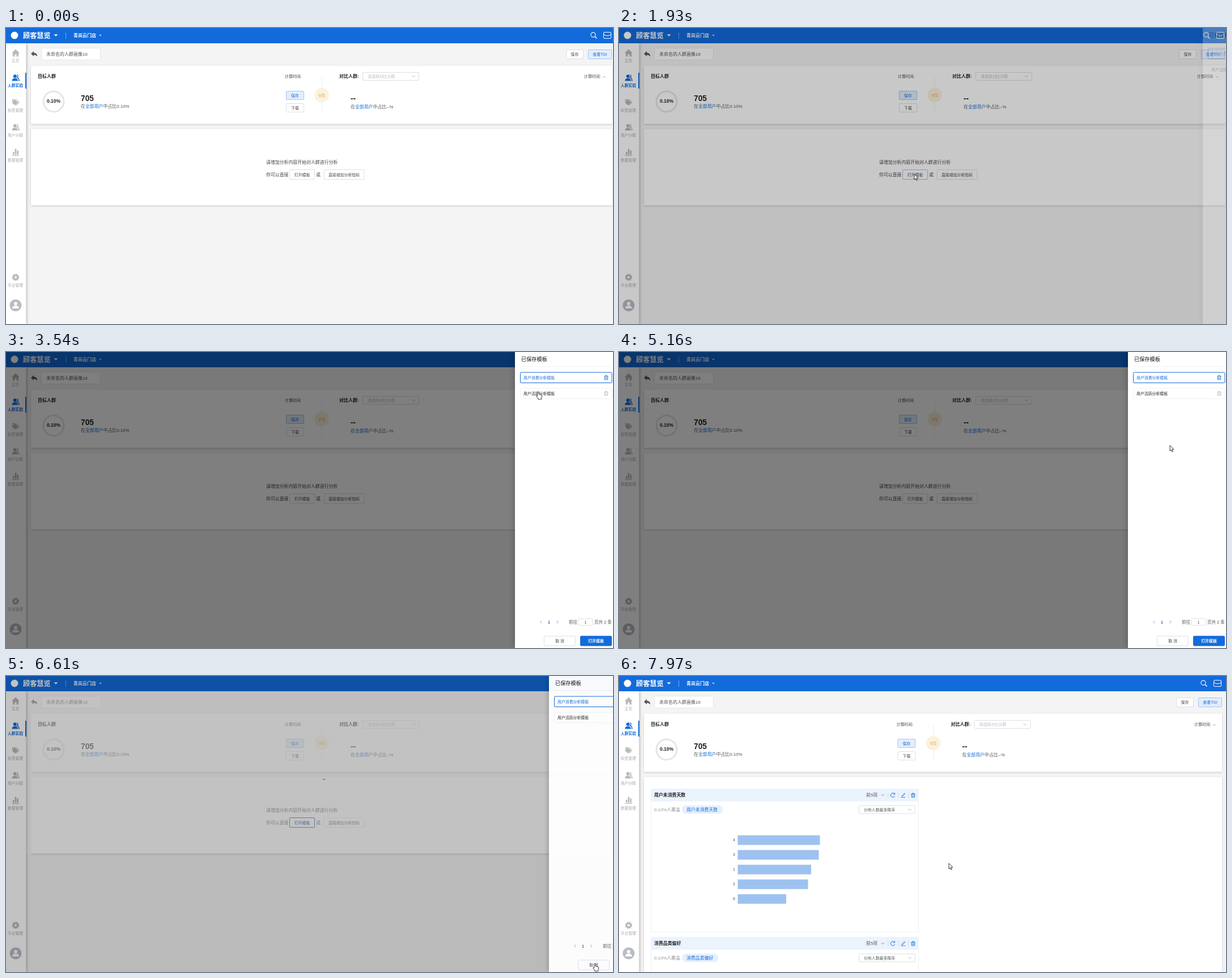
Write an HTML page that moves like this. It is 1071 px wide and 523 px high and loops after 8000 ms.

```html
<!DOCTYPE html>
<html lang="zh">
<head>
<meta charset="utf-8">
<title>人群画像</title>
<style>
html, body { margin: 0; width: 100%; height: 100%; overflow: hidden; background: #f4f4f5; }
svg { display: block; width: 1071px; height: 523px; font-family: "Liberation Sans", "Noto Sans CJK SC", "Noto Sans CJK", sans-serif; }
text { white-space: pre; }
.card { filter: drop-shadow(0 1px 1.5px rgba(0,0,0,.2)); }
.side { filter: drop-shadow(1px 0 2px rgba(0,0,0,.3)); }
.panel { filter: drop-shadow(-2px 0 4px rgba(0,0,0,.2)); }
</style>
</head>
<body>
<svg id="stage" viewBox="0 0 1071 523"></svg>
<script>
const BLUE = '#136bdb', INK = '#222', GREY = '#b9b9b9';

// Drawing helpers
const text = (x, cy, size, str, fill = INK, more = '') =>
  `<text x="${x}" y="${cy + size * .37}" font-size="${size}" fill="${fill}" ${more}>${str}</text>`;
const bold = 'font-weight="700"', mid = 'text-anchor="middle"';
const rect = (x, y, w, h, fill, stroke = 'none', r = 0, more = '') =>
  `<rect x="${x}" y="${y}" width="${w}" height="${h}" rx="${r}" fill="${fill}" stroke="${stroke}" ${more}/>`;
const path = (d, stroke, width = 1, fill = 'none') =>
  `<path d="${d}" stroke="${stroke}" stroke-width="${width}" fill="${fill}"/>`;
const solid = (d, fill) => `<path d="${d}" fill="${fill}"/>`;
const circle = (x, y, r, fill, more = '') => `<circle cx="${x}" cy="${y}" r="${r}" fill="${fill}" ${more}/>`;
const at = (x, y, body) => `<g transform="translate(${x} ${y})">${body}</g>`;
const group = (attrs, body) => `<g ${attrs}>${body}</g>`;

const button = (x, y, w, h, str, style = 'plain') => {
  const [fill, edge, ink] = {
    plain: ['#fff', '#dcdfe6', '#444'],
    tint: ['#e3eefc', '#a3c6f2', BLUE],
    hot: ['#fff', BLUE, BLUE],
    main: [BLUE, BLUE, '#fff']
  }[style];
  return rect(x + .5, y + .5, w - 1, h - 1, fill, edge, 1.5) +
    text(x + w / 2, y + h / 2, 6.9, str, ink, mid + (style === 'main' ? ' ' + bold : ''));
};
const chevron = (x, y, c = '#aaa') => path(`M${x - 2.5} ${y - 1.2}l2.5 2.5l2.5-2.5`, c, .9);
const select = (x, y, str, ink) =>
  rect(x + .5, y + .5, 99, 14, '#fff', '#dcdfe6', 1.5) + text(x + 9, y + 7.5, 6.9, str, ink) + chevron(x + 90, y + 7.5);
const trash = (x, y, c) =>
  at(x, y, path('M-3.6-2.2H3.6M-1.3-2.4V-3.6H1.3V-2.4M-2.7-2V3.5H2.7V-2M-.9-.4V2M.9-.4V2', c, .9));
const triangle = (x, y, s) => solid(`M${x - s} ${y - s / 2}h${2 * s}l${-s} ${s}z`, '#fff');

// Sidebar icons, centred on 0,0
const icons = {
  home: c => solid('M-7 .5L0-6.5L7 .5H5V6.5H1.6V2.5H-1.6V6.5H-5V.5Z', c),
  people: c => circle(-1.2, -2.8, 3, c) + solid('M-6.5 5.5Q-6.5.8-1.2.8T4 5.5Z', c) +
    path('M2.4-5.3A2.7 2.7 0 0 1 2.6-.3Q6 .8 6 5H5', c, 1.4),
  tag: c => solid('M-6-5.5H-1L4 0L-1 5.5L-6 .5ZM.5-5.5H1.8L6.5-.2L2 5L1 4L4.9-.2Z', c) + circle(-3.8, -3.2, 1, '#fff'),
  chart: c => solid('M-6.5 5H6.5V6.3H-6.5ZM-5-.5H-2.4V4H-5ZM-1.3-6H1.3V4H-1.3ZM2.4-3H5V4H2.4Z', c),
  gear: c => circle(0, 0, 3.6, 'none', `stroke="${c}" stroke-width="3"`) +
    circle(0, 0, 5.3, 'none', `stroke="${c}" stroke-width="2" stroke-dasharray="2.4 1.763"`)
};
const nav = (icon, y, label, on) =>
  at(17, y, icons[icon](on ? BLUE : GREY)) +
  text(16.5, y + 13.7, 6.8, label, on ? BLUE : '#aaa', mid + (on ? ' ' + bold : ''));

const header = rect(0, 0, 1071, 27, BLUE) + circle(15, 13, 6.5, '#fff') +
  text(30, 13, 12.2, '顾客慧览', '#fff', 'font-weight="900"') + triangle(88, 13, 3.5) +
  rect(105, 8, .8, 11, '#8fb9ef') + text(119, 13, 8, '青岚云门店', '#fff', bold) + triangle(166.5, 13, 2.2) +
  group('class="right"',
    circle(1036, 12, 4.1, 'none', 'stroke="#fff" stroke-width="1.1"') + path('M1039 15l3.5 3.5', '#fff', 1.5) +
    rect(1054.5, 7.5, 13, 11, 'none', '#fff', 1.5) + path('M1055 11.5Q1061 16 1067 11.5', '#fff'));

const sidebar = rect(0, 27, 35.5, 496, '#fff', 'none', 0, 'class="side"') + rect(34, 79, 2, 28, BLUE) +
  nav('home', 44, '主页') + nav('people', 88, '人群实验', true) + nav('tag', 131.5, '标签管理') +
  nav('people', 175.5, '用户分群') + nav('chart', 219.5, '数据管理') + nav('gear', 440.5, '平台管理') +
  circle(17, 490, 10.5, '#b8bcc4') + circle(17, 487, 2.9, '#fff') + solid('M11 495.5Q11 490.5 17 490.5T23 495.5Z', '#fff');

const share = (x, y, value) =>
  text(x, y, 7.9, `在<tspan fill="${BLUE}">全部用户</tspan>中占比${value}`, '#555');

const summary =
  solid('M44 45.5L49 41V43.7Q55 43.7 55.2 50.5Q53 47.4 49 47.5V50Z', '#555') +
  rect(62.5, 35.5, 104, 21, '#fff', '#e4e6ea', 2) + text(71, 46, 8, '未命名的人群画像16', '#555') +
  group('class="right"', button(988, 38, 31, 17, '保存') + button(1027, 38, 42, 17, '查看TGI', 'tint')) +
  rect(44, 66.5, 1026, 103, '#fff', 'none', 1, 'class="card wide"') +
  rect(44, 178.5, 1026, 135, '#fff', 'none', 1, 'class="card wide" id="body"') +
  text(56, 85.5, 8, '目标人群', INK, bold) +
  circle(84, 130, 18, 'none', 'stroke="#e6e6e8" stroke-width="3"') +
  text(84, 129.3, 8.5, '0.10%', INK, mid + ' ' + bold) +
  text(132, 123.5, 13.8, '705', INK, bold) + share(132, 138.5, '0.10%') +
  group('class="middle"',
    text(492, 85.5, 6.9, '计算时间:', '#444') +
    button(494, 111, 32, 16, '保存', 'tint') + button(494, 133, 32, 16, '下载') +
    path('M557 87V150', '#eee', 1) + circle(557, 118.5, 12.8, '#fbf2de') + text(557, 118.5, 8.6, 'VS', '#dca24a', mid) +
    text(588, 85.5, 8, '对比人群:', INK, bold) + select(629, 78, '请选择对比分群', '#b8bcc4') +
    text(608, 124, 13.8, '--', INK, bold) + share(608, 139, '--%')) +
  group('class="right"', text(1020, 85, 6.9, '计算时间: &#160;--', '#444'));

const empty = text(459, 237, 7.9, '请增加分析内容开始对人群进行分析', '#444') +
  text(459, 259, 7.9, '你可以直接', '#444') + button(500, 250, 45, 18, '打开模板') +
  text(547, 259, 7.9, '或', '#444') + button(560.5, 250, 72, 18, '直接增加分析指标');

const widget = (y, title) => at(0, y,
  rect(56.5, .5, 472, 252.5, '#fff', '#eef0f3') + rect(56, 0, 473, 22.5, '#ebf3fd') +
  text(62, 11.5, 7.9, title, INK, bold) + text(436, 11.5, 7.9, '前5项', '#555') + chevron(465.5, 11.5, '#777') +
  [474.5, 492.5, 510.5].map(x => rect(x, 6.5, .8, 10, '#c9d3e0')).join('') +
  path('M486.2 9.5A3.7 3.7 0 1 0 486.5 13M486.6 7.5V10H484', BLUE, 1) +
  path('M497.5 15.5H505M498.5 13.5L503.5 8L505 9.2L500 14Z', BLUE, .8) + trash(519, 11.7, BLUE) +
  text(62, 37, 7.9, '0.10%人覆盖', '#999') +
  rect(111, 29.5, title.length * 7.9 + 17, 15, '#e6f0fd', 'none', 7.5) + text(119, 37, 7.9, title, BLUE) +
  select(423, 29.5, '分布人数最多降序', '#555'));

const bars = [[4, 145], [3, 143], [1, 129.5], [2, 124], [6, 85.5]];
const dash = widget(199, '用户未消费天数') + widget(461, '消费品类偏好') +
  bars.map(([n], i) => text(205, 289.5 + i * 26, 7, n, '#555', 'text-anchor="end"') +
    rect(209.5, 281.5 + i * 26, 0, 17, '#9ec2f0', 'none', 0, 'class="bar"')).join('');

const item = (y, str, on) => rect(907.5, y + .5, 161.5, 18.5, '#fff', on ? BLUE : '#f0f1f3', 1.5) +
  text(913, y + 9.5, 6.9, str, on ? BLUE : INK) + trash(1059, y + 9.7, on ? BLUE : '#bbb');
const items = pick => item(35.5, '用户消费分析模板', pick === 0) + item(63.5, '用户活跃分析模板', pick === 1);

const drawer = rect(898, 0, 180, 523, '#fff', 'none', 0, 'class="panel"') +
  text(909, 12.5, 9.2, '已保存模板', '#111', 'font-weight="500"') + rect(907, 25.5, 162, .8, '#eceef1') +
  group('class="pick"', items(0)) + group('class="pick"', items(1)) +
  path('M945 474.5l-2.5 2.5l2.5 2.5M971.5 474.5l2.5 2.5l-2.5 2.5', '#999', .9) +
  text(958, 477, 7.2, '1', BLUE, mid + ' ' + bold) + text(993, 477.3, 7.5, '前往', '#555') +
  rect(1009.5, 471, 26, 12, '#fff', '#dcdfe6', 1.5) + text(1022.5, 477.3, 7.2, '1', '#555', mid) +
  text(1038, 477.3, 7.5, '页共 2 条', '#555') +
  button(949, 501.5, 56, 18, '取 消') + button(1013, 501.5, 56, 18, '打开模板', 'main') +
  group('id="lit"', rect(1013, 501.5, 56, 18, '#4388e3', 'none', 1.5) + text(1041, 510.5, 6.9, '打开模板', '#fff', mid + ' ' + bold));

const stage = document.getElementById('stage');
stage.innerHTML = rect(0, 0, 1071, 523, '#f4f4f5') + summary +
  group('id="empty"', empty) + group('id="dash"', dash) +
  group('id="mask"', rect(36, 27, 1035, 287, '#fff', 'none', 0, 'id="veil" fill-opacity=".9"') +
    circle(0, 0, 15, 'none', `id="spin" stroke="${BLUE}" stroke-width="1.5" stroke-linecap="round"`)) +
  group('id="hot"', button(500, 250, 45, 18, '打开模板', 'hot')) +
  sidebar + header + rect(0, 0, 1071, 523, '#000', 'none', 0, 'id="shade"') +
  group('id="drawer"', drawer) +
  group('id="pointer"',
    group('id="arrow"', path('M0 0V9.8L2.2 7.8L3.8 11.3L5.4 10.6L3.9 7.1H6.9Z', '#222', .9, '#fff')) +
    group('id="hand"', path('M-1.2.9Q0-.6 1.2.9V4.8L5.4 5.8Q6.9 6.3 6.7 8L5.8 11.4V13.4H-.2V11.8L-3.2 8.3Q-3.2 6.6-1.2 7.8Z', '#222', .9, '#fff')));

const el = id => document.getElementById(id);
const all = cls => [...stage.querySelectorAll('.' + cls)];
const set = (node, attrs) => { for (const k in attrs) node.setAttribute(k, attrs[k]); };
const show = (node, on) => set(node, { visibility: on ? 'visible' : 'hidden' });
const clamp = v => Math.min(1, Math.max(0, v));
const span = (t, from, length) => clamp((t - from) / length);

const bezier = (x1, y1, x2, y2) => x => {
  if (x <= 0 || x >= 1) return clamp(x);
  const curve = (a, b, s) => 3 * a * s * (1 - s) ** 2 + 3 * b * s * s * (1 - s) + s ** 3;
  let lo = 0, hi = 1;
  for (let i = 0; i < 24; i++) {
    const m = (lo + hi) / 2;
    if (curve(x1, x2, m) < x) lo = m; else hi = m;
  }
  return curve(y1, y2, lo);
};
const ease = bezier(.25, .1, .25, 1), inOut = bezier(.42, 0, .58, 1);

// Pointer stops: time, x, y
const stops = [
  [220, 1033, 520], [550, 790, 398], [760, 790, 398], [1540, 521, 258], [2190, 521, 258],
  [2480, 892, 119], [2510, 892, 119], [2940, 936, 41], [3119, 936, 41], [3120, 933, 40],
  [3269, 933, 40], [3270, 936, 41], [3420, 936, 41], [3540, 939, 70], [3700, 940, 76],
  [4230, 940, 76], [4570, 940, 48], [4900, 940, 48], [5670, 1060, 488], [5710, 1060, 488],
  [6490, 1039, 508], [6720, 1039, 508], [7300, 592, 343], [7640, 592, 343], [7790, 571, 343], [7970, 582, 331]
];
const handTimes = [[1440, 1880], [2860, 5000], [5850, 6780]];
const within = (t, a, b) => t >= a && t < b;

function pointerAt(t) {
  const i = stops.findIndex(s => s[0] > t);
  if (i < 0) return stops[stops.length - 1].slice(1);
  if (i === 0) return stops[0].slice(1);
  const [t0, x0, y0] = stops[i - 1], [t1, x1, y1] = stops[i];
  const p = (t - t0) / (t1 - t0), k = p * p * (3 - 2 * p);
  return [x0 + (x1 - x0) * k, y0 + (y1 - y0) * k];
}

const OPEN = 1879, CLOSE = 6550, LOAD = 6510, SWAP = 6950, DONE = 7200;
const groups = { wide: all('wide'), right: all('right'), middle: all('middle'), bar: all('bar'), pick: all('pick') };

function draw(t) {
  const loaded = t >= SWAP, closing = t >= CLOSE;

  for (const n of groups.wide) set(n, { width: loaded ? 1020 : 1026 });
  set(el('body'), { height: loaded ? 360 : 135 });
  for (const n of groups.right) set(n, { transform: `translate(${loaded ? -5 : 0})` });
  for (const n of groups.middle) set(n, { transform: `translate(${loaded ? -2.5 : 0})` });
  show(el('empty'), !loaded);
  show(el('dash'), loaded);
  const grow = 1 - (1 - span(t, SWAP, 500)) ** 3;
  groups.bar.forEach((n, i) => set(n, { width: bars[i][1] * grow }));

  // Loading veil and spinner
  set(el('mask'), { opacity: ease(span(t, LOAD, 300)) - ease(span(t, DONE, 300)) });
  set(el('veil'), { height: loaded ? 496 : 287 });
  const turn = 40 + (t - LOAD) * .18, k = inOut(span(t, LOAD - 10, 750));
  show(el('spin'), within(t, LOAD, SWAP));
  set(el('spin'), {
    transform: `translate(556 168.5) rotate(${turn})`,
    'stroke-dasharray': `${.75 * (1 + 89 * k)} 150`, 'stroke-dashoffset': -30 * k
  });

  const hot = within(t, 1440, OPEN + 70) ? 1 - span(t, OPEN, 70) : within(t, CLOSE + 30, SWAP) ? .55 : 0;
  set(el('hot'), { opacity: hot });

  // Drawer
  const out = span(t, CLOSE, 275);
  const move = closing ? 1 - ease(out) : ease(span(t, OPEN, 300));
  const fade = closing ? ease(1 - out) : move;
  const dim = closing ? 1 - ease(span(t, CLOSE, 200)) : ease(span(t, OPEN, 200));
  set(el('shade'), { opacity: dim / 2 });
  set(el('drawer'), { opacity: fade, transform: `translate(${Math.round(173 * (1 - move))})` });
  const pick = within(t, 3850, 4540) ? 1 : 0;
  groups.pick.forEach((n, i) => show(n, i === pick));
  show(el('lit'), t >= 5850);

  const [x, y] = pointerAt(t), hand = handTimes.some(([a, b]) => within(t, a, b));
  set(el('pointer'), { transform: `translate(${Math.round(x)} ${Math.round(y)})` });
  show(el('arrow'), t >= 220 && !hand);
  show(el('hand'), hand);
}

const start = performance.now();
function tick() {
  draw((performance.now() - start) % 8000);
  requestAnimationFrame(tick);
}
tick();
</script>
</body>
</html>
```
